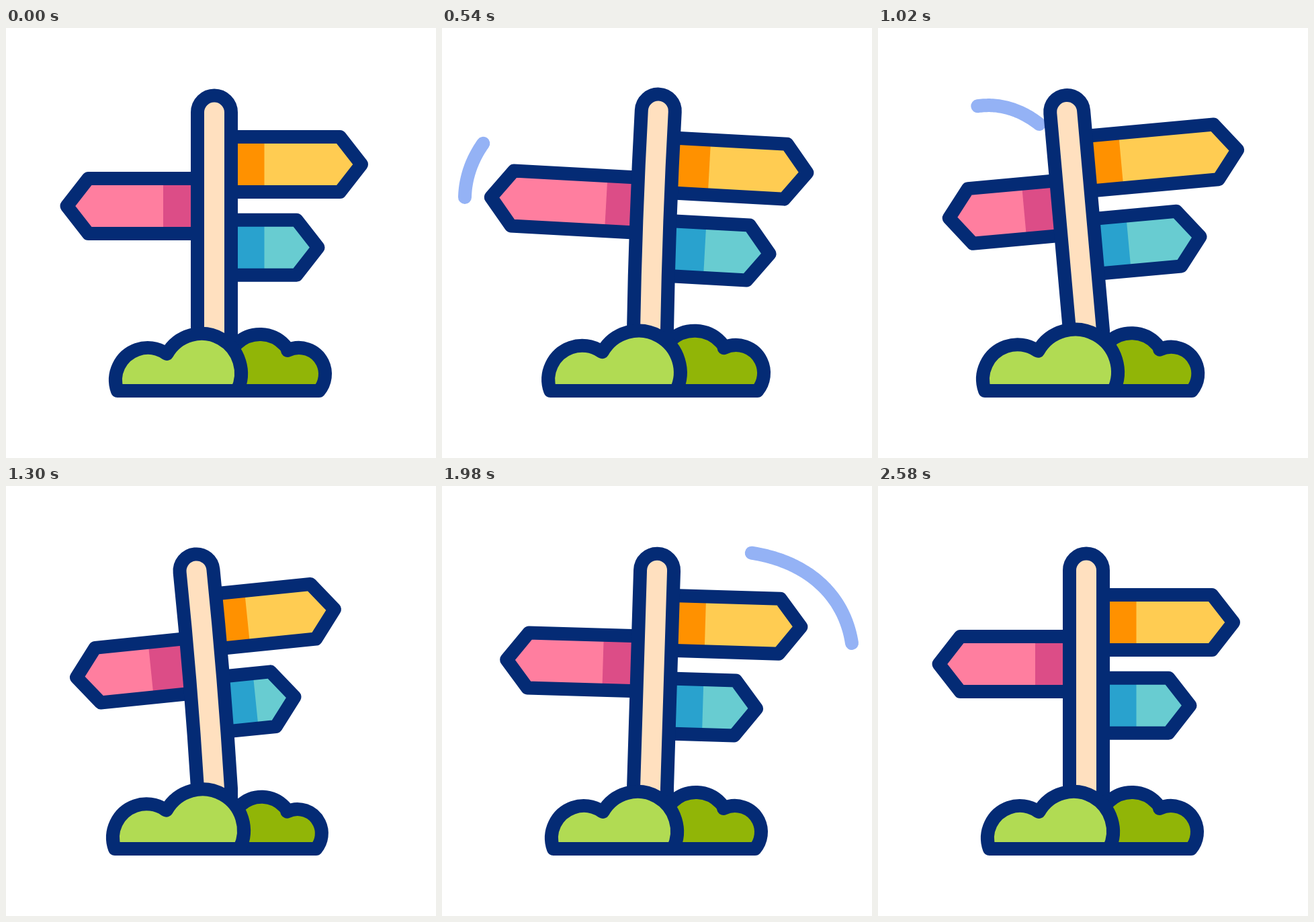
Recreate the animation shown at these times as an HTML page with a canvas. Size 640 by 640 pixels, loop 2960 ms.

```html
<!DOCTYPE html>
<html lang="en">
<head>
<meta charset="utf-8">
<title>Swaying signpost</title>
<style>
  html, body { margin: 0; height: 100%; overflow: hidden; background: #fff; }
  canvas { display: block; width: 640px; height: 640px; }
</style>
</head>
<body>
<canvas id="stage" width="640" height="640"></canvas>
<script>
const ctx = document.getElementById('stage').getContext('2d');
const LOOP = 2960;
const NAVY = '#042b75';
const BASE = { x: 310, y: 450 };
const GROUND = 540;
const POLE_LENGTH = 324.5;
const SWING = [200, 490, 1180, 1690, 2200];

const ease = (t, from, to) => {
  const p = Math.min(1, Math.max(0, (t - from) / (to - from)));
  return p * p * (3 - 2 * p);
};
const radians = deg => deg * Math.PI / 180;

// Eases from rest through each peak in turn and back to rest.
function sway(t, beats, ...peaks) {
  const values = [0, ...peaks, 0];
  return beats.slice(1).reduce(
    (sum, beat, i) => sum + (values[i + 1] - values[i]) * ease(t, beats[i], beat), 0);
}

// The signs trail a little behind the pole.
const poleLean = t => radians(sway(t, SWING, 2.2, -6.2, 4.5));
const signLean = t => radians(sway(t - 20, SWING, 3.2, -6.9, 3.8));

const signs = [
  { y: 203, side: 1, length: 219, light: '#ffcc52', dark: '#ff9100',
    beats: [500, 880, 1580, 2040], peaks: [38, -42] },
  { y: 265, side: -1, length: 219.5, light: '#ff7e9f', dark: '#dc4d87',
    beats: [200, 500, 1160, 1690], peaks: [29, -39] },
  { y: 326.7, side: 1, length: 154.5, light: '#68ccd1', dark: '#29a2ce',
    beats: [300, 860, 1400, 1830], peaks: [42, -28] }
];

// Each bush is two round hills that meet at a notch.
const bushes = [
  { x: 410, color: '#91b507', hills: [[378, 506, 50], [436, 515, 39]], notch: [419, 480],
    beats: [200, 740, 1400, 1940], peaks: [0.09, -0.09] },
  { x: 256.5, color: '#b1db53', hills: [[211, 524, 48], [291, 514, 59]], notch: [238, 484],
    beats: [200, 800, 1800], peaks: [0.085] }
];

const swooshes = [
  { points: [[34, 252], [36, 155], [145, 69], [240, 143]], head: [390, 806], tail: [720, 1204] },
  { points: [[610, 234], [597, 150], [525, 100], [430, 97]], head: [1675, 2061], tail: [2020, 2560] }
];

function strokePath(color = NAVY) {
  ctx.strokeStyle = color;
  ctx.lineWidth = 20;
  ctx.stroke();
}

function fillPath(color) {
  ctx.fillStyle = color;
  ctx.fill();
}

function drawSwoosh({ points, head, tail }, t) {
  const from = ease(t, ...tail), to = ease(t, ...head);
  if (to - from < 0.001) return;
  const at = (u, axis) => {
    const v = 1 - u, [a, b, c, d] = points.map(p => p[axis]);
    return v * v * v * a + 3 * v * v * u * b + 3 * v * u * u * c + u * u * u * d;
  };
  ctx.beginPath();
  for (let i = 0; i <= 40; i++) {
    const u = from + (to - from) * i / 40;
    ctx.lineTo(at(u, 0), at(u, 1));
  }
  strokePath('#94b2f5');
}

function drawSign({ y, side, length, light, dark, beats, peaks }, t) {
  const tip = length + sway(t, beats, ...peaks), corner = tip - 32;
  ctx.save();
  ctx.translate(BASE.x, BASE.y);
  ctx.rotate(signLean(t));
  ctx.translate(0, y - BASE.y);
  ctx.scale(side, 1);
  ctx.beginPath();
  ctx.moveTo(0, -41);
  ctx.lineTo(corner, -41);
  ctx.lineTo(tip, 0);
  ctx.lineTo(corner, 41);
  ctx.lineTo(0, 41);
  ctx.closePath();
  fillPath(light);
  ctx.fillStyle = dark;
  ctx.fillRect(0, -41, side > 0 ? 74.5 : 76, 82);
  strokePath();
  ctx.restore();
}

// The pole bends so that its upper end points along the signs' lean.
function drawPole(t) {
  const lean = poleLean(t), tilt = signLean(t), r = 25;
  const length = POLE_LENGTH + sway(t, [200, 730, 1400], 3);
  const topX = length * Math.sin(lean), topY = -length * Math.cos(lean);
  const midX = topX - length / 2 * Math.sin(tilt), midY = topY + length / 2 * Math.cos(tilt);
  const dx = r * Math.cos(tilt), dy = r * Math.sin(tilt);
  ctx.save();
  ctx.translate(BASE.x, BASE.y);
  ctx.beginPath();
  ctx.moveTo(-r, 40);
  ctx.lineTo(-r, 0);
  ctx.quadraticCurveTo(midX - dx, midY - dy, topX - dx, topY - dy);
  ctx.arc(topX, topY, r, Math.PI + tilt, tilt);
  ctx.quadraticCurveTo(midX + dx, midY + dy, r, 0);
  ctx.lineTo(r, 40);
  ctx.closePath();
  fillPath('#ffe0bf');
  strokePath();
  ctx.restore();
}

function drawBush({ x, color, hills, notch, beats, peaks }, t) {
  const size = 1 + sway(t, beats, ...peaks);
  const toNotch = ([cx, cy]) => Math.atan2(notch[1] - cy, notch[0] - cx);
  const toGround = ([, cy, r]) => Math.asin((GROUND - cy) / r);
  const [left, right] = hills;
  ctx.save();
  ctx.translate(x, GROUND);
  ctx.scale(size, size);
  ctx.translate(-x, -GROUND);
  ctx.beginPath();
  ctx.arc(...left, Math.PI - toGround(left), toNotch(left));
  ctx.arc(...right, toNotch(right), toGround(right));
  ctx.closePath();
  ctx.restore();
  fillPath(color);
  strokePath();
}

function draw(t) {
  ctx.fillStyle = '#fff';
  ctx.fillRect(0, 0, 640, 640);
  ctx.lineCap = ctx.lineJoin = 'round';
  swooshes.forEach(s => drawSwoosh(s, t));
  signs.forEach(s => drawSign(s, t));
  drawPole(t);
  bushes.forEach(b => drawBush(b, t));
}

const start = performance.now();
function tick() {
  draw((performance.now() - start) % LOOP);
  requestAnimationFrame(tick);
}
tick();
</script>
</body>
</html>
```
